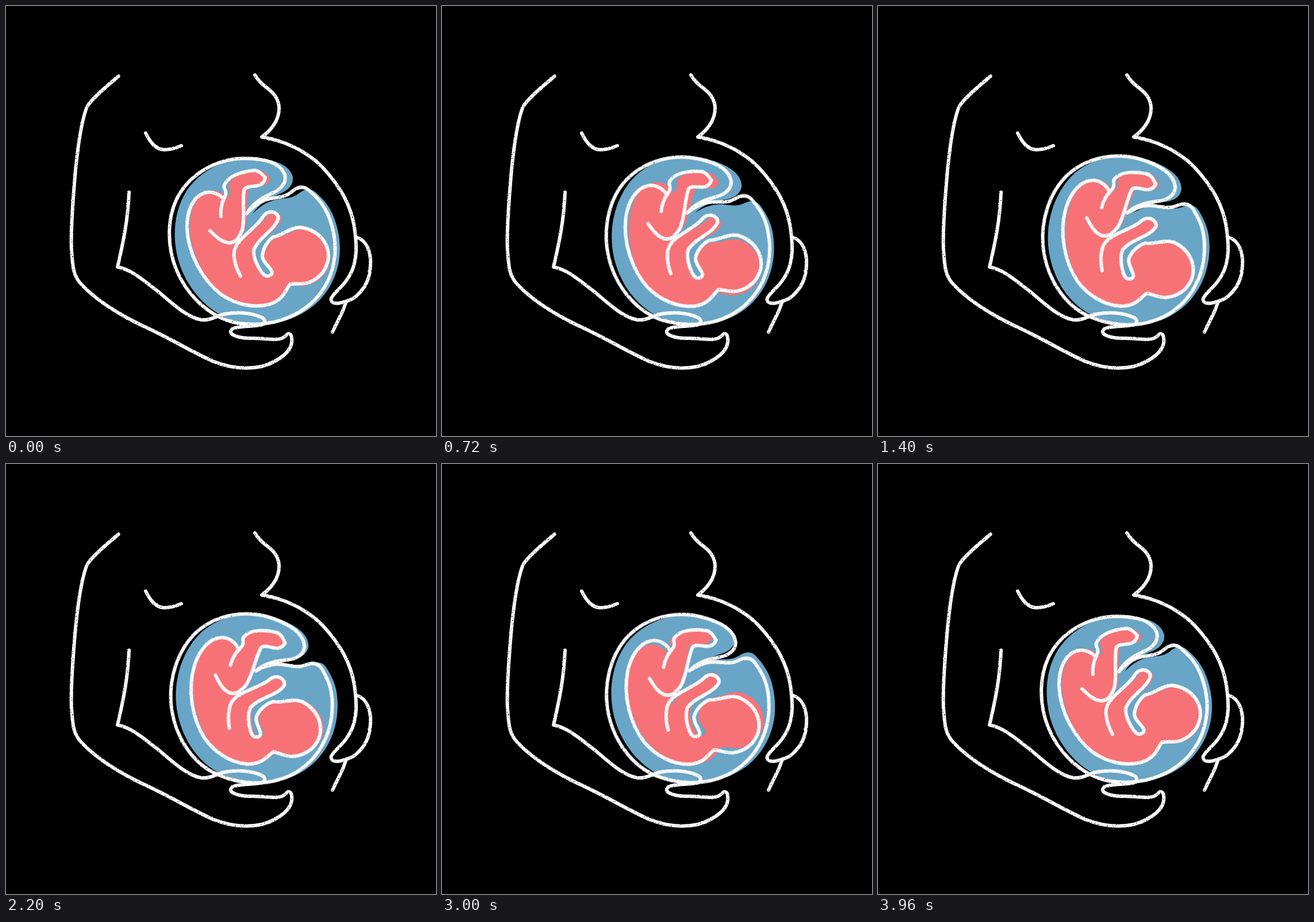
An HTML page that plays this animation: 748x748 px, repeating every 4 s.

```html
<!DOCTYPE html>
<html lang="en">
<head>
<meta charset="utf-8">
<title>Expecting</title>
<style>
  html, body { margin: 0; width: 100%; height: 100%; overflow: hidden; background: #000; }
  svg { display: block; width: 100%; height: 100%; }

  .line { fill: none; stroke: #fdfdfd; stroke-width: 6; stroke-linecap: round; stroke-linejoin: round; }

  .rock { transform-origin: 430px 407px; animation: rock 4s infinite; }
  .tint { animation-delay: -.35s; }
  .water { fill: #68a5c6; translate: 9px 0; }
  .skin { fill: #f67277; translate: 4px 0; }

  @keyframes rock {
    0% { rotate: 0deg; animation-timing-function: cubic-bezier(.32, 0, .32, 1); }
    50% { rotate: 19.3deg; animation-timing-function: cubic-bezier(.68, 0, .68, 1); }
    100% { rotate: 0deg; }
  }
</style>
</head>
<body>
<svg viewBox="0 0 748 748">
  <defs>
    <filter id="chalk" filterUnits="userSpaceOnUse" x="90" y="100" width="560" height="550" color-interpolation-filters="sRGB">
      <feTurbulence type="fractalNoise" baseFrequency=".45" numOctaves="2" seed="4" result="grain"/>
      <feDisplacementMap in="SourceGraphic" in2="grain" scale="2" xChannelSelector="R" yChannelSelector="G" result="rough"/>
      <feColorMatrix in="grain" values="0 0 0 0 1  0 0 0 0 1  0 0 0 0 1  8 0 0 0 -1.7" result="holes"/>
      <feComposite in="rough" in2="holes" operator="in"/>
    </filter>

    <path id="womb" d="M419 361 C430 342 446 334 462 326 C480 319 488 306 485 294
      C477 271 446 265 413 265 C370 266 325 288 301 328 C280 365 279 415 296 458
      C315 504 354 541 400 551 C452 560 505 546 540 508 C572 472 579 425 567 383
      C558 350 544 335 526 320 C516 312 506 315 496 324 C484 334 470 332 456 336 C440 341 430 349 419 361 Z"/>

    <path id="leg" d="M374 366 C373 350 376 342 382 329 C385 321 377 319 380 311 C386 296 410 288 431 286
      C439 286 444 291 451 298 C450 306 445 312 434 313 C426 314 415 314 414 321
      C411 345 416 370 411 389 C406 404 398 412 388 412 C375 411 364 400 355 391"/>

    <path id="torso" d="M378 335 C369 326 358 322 346 325 C324 332 314 358 315 388
      C317 430 340 474 372 500 C398 519 430 526 458 519 C483 511 485 496 494 484
      C505 482 515 485 527 481 C546 473 559 458 561 436 C561 410 542 389 512 385
      C492 386 484 398 464 402 C453 411 446 424 446 437 C449 449 461 455 463 463
      C462 471 452 472 446 465 C436 451 430 437 431 424 C438 407 456 396 467 382
      C475 371 477 364 466 359 C456 356 449 362 444 371 C434 384 419 395 408 407
      C399 417 395 428 397 437 C398 449 403 461 408 470"/>
  </defs>

  <use href="#womb" class="rock tint water"/>
  <g class="rock tint skin">
    <use href="#torso"/>
    <use href="#leg"/>
  </g>

  <g class="rock line">
    <g filter="url(#chalk)">
      <use href="#womb"/>
      <use href="#torso"/>
      <use href="#leg"/>
    </g>
  </g>

  <g class="line" filter="url(#chalk)">
    <!-- arm and supporting hand -->
    <path d="M196 122 C178 137 150 160 141 175 C131 200 125 245 121 285 C117 330 112 390 114 425
      C116 450 116 468 130 483 C155 510 190 533 235 555 C280 575 320 600 360 618
      C390 630 420 632 445 627 C475 618 500 600 497 578 C496 568 491 569 486 574
      C478 582 465 580 450 579 C430 577 412 580 397 573 C388 569 389 563 398 560
      C415 556 430 558 447 554 C452 550 451 544 443 541 C425 533 400 532 380 536
      C362 541 355 547 340 546 C315 542 290 518 265 497 C240 478 218 458 194 454
      C203 415 212 375 214 324"/>
    <!-- chest, belly and far hand -->
    <path d="M243 221 C252 240 262 250 275 250 C286 250 296 247 305 243"/>
    <path d="M433 120 C445 140 458 142 468 156 C481 175 477 204 445 228 C480 233 520 250 550 280
      C580 312 600 345 606 385 C611 420 610 440 602 460 C592 485 572 496 566 508
      C563 517 574 520 590 514 C600 511 605 509 612 502 C630 485 635 465 634 440 C632 420 625 407 609 402"/>
    <path d="M592 514 L586 530 L568 567"/>
  </g>
</svg>
</body>
</html>
```
